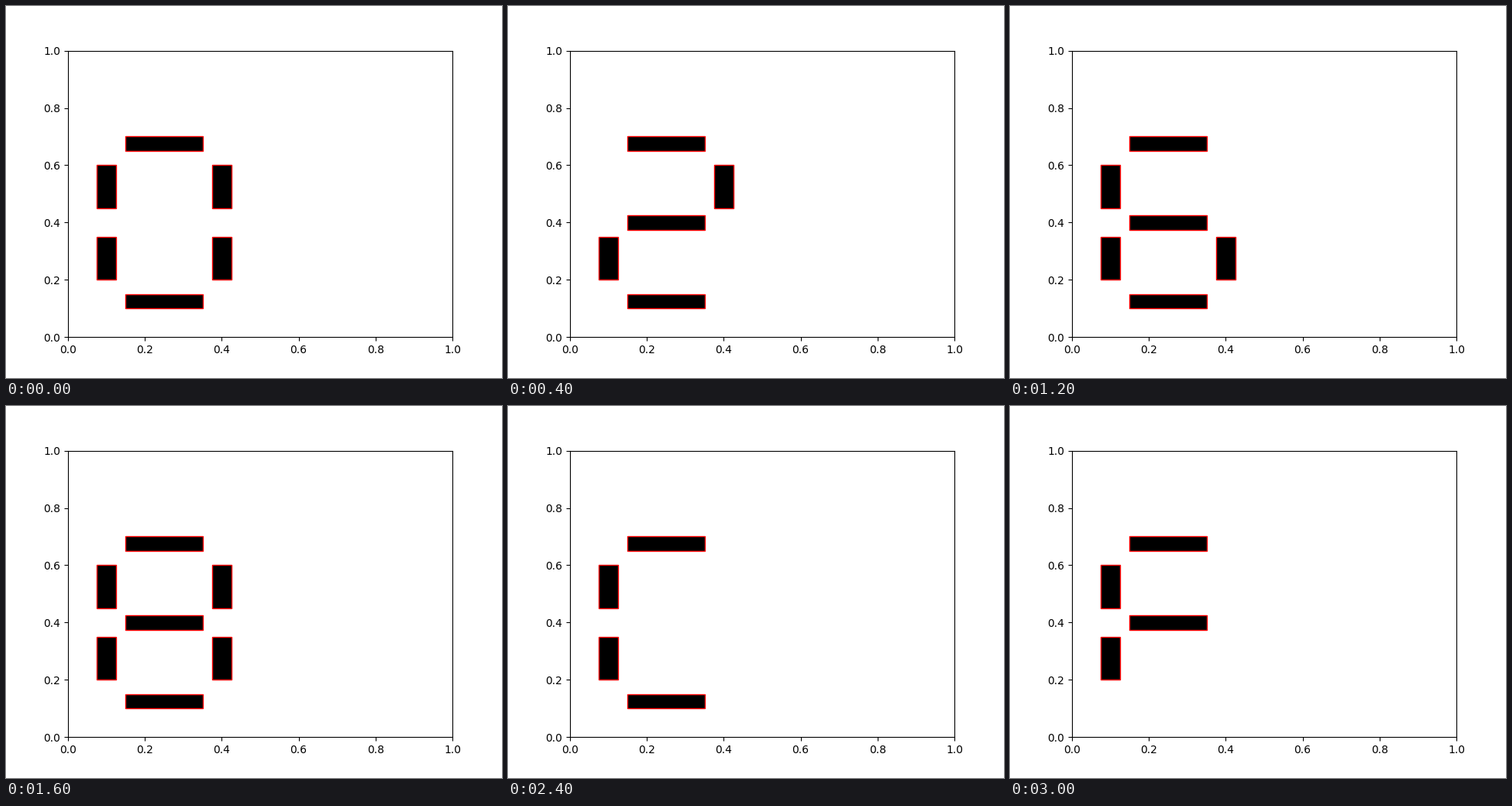
Write a matplotlib script that moves like this. It is 640 px wide and 480 px high and loops after 3.2 s.

```python
import matplotlib.pyplot as plt
from matplotlib.animation import FuncAnimation
from matplotlib.patches import Rectangle

STEP_MS = 200

# Lit segments for the hexadecimal digits 0 to F
DIGITS = ("abcdef bc abdeg abcdg bcfg acdfg acdefg abc "
          "abcdefg abcdfg abcefg cdefg adef bcdeg adefg aefg").split()

fig, ax = plt.subplots(figsize=(6.4, 4.8), dpi=100)
ax.set(xlim=(0, 1), ylim=(0, 1))


def bar(x, y, w, h):
    return ax.add_patch(Rectangle((x, y), w, h, fc="black", ec="red", lw=1))


def horizontal(y):
    return bar(0.15, y, 0.2, 0.05)


def vertical(x, y):
    return bar(x, y, 0.05, 0.15)


segments = {
    "a": horizontal(0.65),
    "b": vertical(0.375, 0.45),
    "c": vertical(0.375, 0.2),
    "d": horizontal(0.1),
    "e": vertical(0.075, 0.2),
    "f": vertical(0.075, 0.45),
    "g": horizontal(0.375),
}


def update(i):
    for name, patch in segments.items():
        patch.set_visible(name in DIGITS[i])
    return list(segments.values())


anim = FuncAnimation(fig, update, frames=len(DIGITS), interval=STEP_MS,
                     repeat=True, repeat_delay=0)
plt.show()
```
